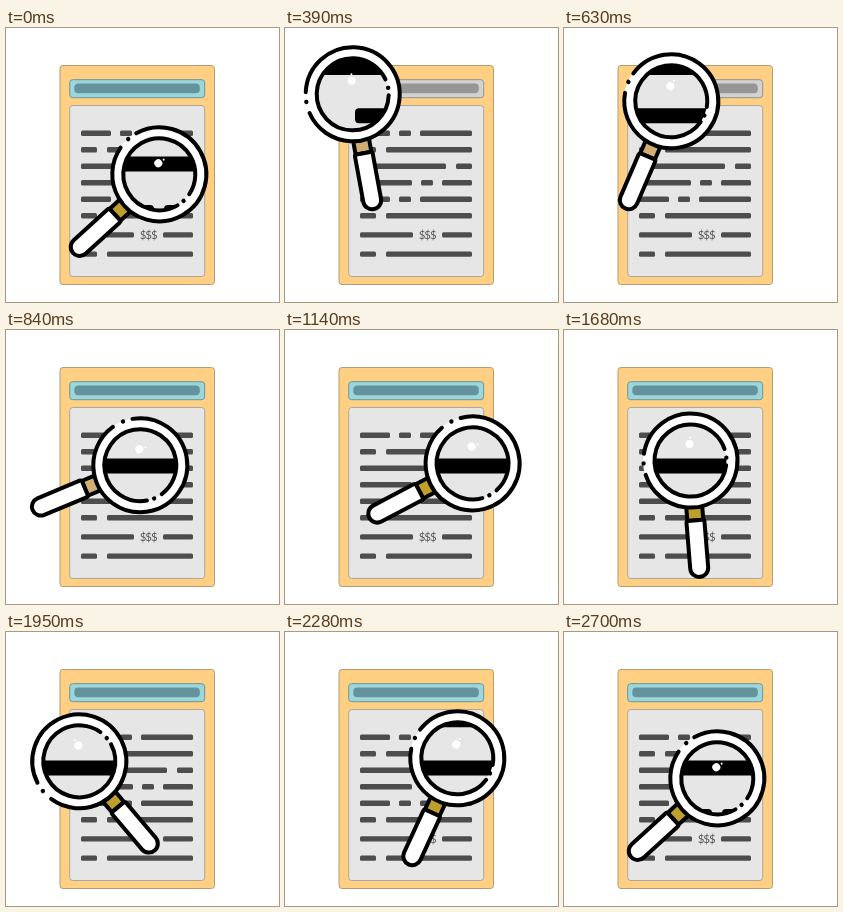
These frames come from a looping animation (273 by 274 pixels, 3630 ms). An HTML page with a canvas:

```html
<!DOCTYPE html>
<html lang="en">
<head>
<meta charset="utf-8">
<title>Document search</title>
<style>
html, body { margin: 0; width: 100%; height: 100%; overflow: hidden; background: #fff; }
canvas { display: block; }
</style>
</head>
<body>
<canvas id="stage"></canvas>
<script>
const W = 273, H = 274, LOOP = 3630, STEP = 30, TRAVEL = 2700;
const RAD = Math.PI / 180;
const canvas = document.getElementById('stage');
const ctx = canvas.getContext('2d');
const ratio = window.devicePixelRatio || 1;
canvas.width = W * ratio;
canvas.height = H * ratio;
canvas.style.width = W + 'px';
canvas.style.height = H + 'px';

// Key points of the search path: the glass returns to rest where it began.
const rest = { x: 153.3, y: 146.3, angle: 137.6 };
const path = [
  { t: 0, ...rest },
  { t: 300, x: 55.5, y: 82, angle: 88 },
  { t: 390, x: 67.7, y: 66.3, angle: 79.6 },
  { t: 550, x: 96, y: 59, angle: 96 },
  { t: 840, x: 134.3, y: 135.2, angle: 157.4 },
  { t: 1330, x: 205, y: 132, angle: 145 },
  { t: 1950, x: 73.3, y: 129.3, angle: 49.8 },
  { t: 2280, x: 172.3, y: 126.3, angle: 114.7 },
  { t: TRAVEL, ...rest }
];

function secant(i, key) {
  const a = path[i], b = path[i + 1];
  return (b[key] - a[key]) / (b.t - a.t);
}

// Monotone slopes: flat at every turning point, so nothing overshoots.
function slope(i, key) {
  if (i === 0 || i === path.length - 1) return 0;
  const a = secant(i - 1, key), b = secant(i, key);
  return a * b <= 0 ? 0 : 2 * a * b / (a + b);
}

function glassAt(t) {
  if (t >= TRAVEL) return rest;
  let i = 0;
  while (path[i + 1].t <= t) i++;
  const a = path[i], b = path[i + 1], span = b.t - a.t;
  const u = (t - a.t) / span, v = 1 - u;
  const blend = key =>
    v * v * (1 + 2 * u) * a[key] + u * u * (3 - 2 * u) * b[key] +
    span * u * v * (v * slope(i, key) - u * slope(i + 1, key));
  return { x: blend('x'), y: blend('y'), angle: blend('angle') };
}

function box(x, y, w, h, r, fill, stroke, lineWidth = 1) {
  ctx.beginPath();
  ctx.roundRect(x, y, w, h, r);
  ctx.fillStyle = fill;
  ctx.fill();
  if (stroke) {
    ctx.strokeStyle = stroke;
    ctx.lineWidth = lineWidth;
    ctx.stroke();
  }
}

function disc(x, y, r, fill) {
  ctx.beginPath();
  ctx.arc(x, y, r, 0, Math.PI * 2);
  ctx.fillStyle = fill;
  ctx.fill();
}

// Text bars are word lengths justified to one column width.
function drawText() {
  const left = 75, column = 112;
  const three = [30, 12, 52], two = [16, 86], price = [53, 30];
  const rows = [three, two, two.toReversed(), three.toReversed(), three, two, price, two];
  rows.forEach((words, i) => {
    const y = 105.2 + 16.5 * i + 2.7 * Math.max(0, i - 5);
    const gap = (column - words.reduce((a, b) => a + b)) / (words.length - 1);
    let x = left;
    for (const word of words) {
      box(x, y - 2.7, word, 5.4, 1.5, '#4d4d4d');
      x += word + gap;
    }
  });
  ctx.fillStyle = '#555';
  ctx.font = '11.5px Lato, sans-serif';
  ctx.letterSpacing = '-1px';
  ctx.textAlign = 'center';
  ctx.fillText('$$$', 142.2, 211.3);
}

function drawDocument(headerCovered) {
  const [field, bar, edge] = headerCovered
    ? ['#d2d2d2', '#969696', '#929292']
    : ['#9bd7da', '#64939e', '#6d9598'];
  box(54, 37.5, 154.5, 219, 3, '#ffd083', '#b49b76');
  box(63.7, 51.7, 135, 18, 3, field, edge);
  box(68.3, 55.5, 125.5, 9.7, 4, bar);
  box(63.7, 77.5, 135, 171, 3, '#e6e6e6', '#aaa79f');
  drawText();
}

// The enlarged page stays still; the lens only uncovers it.
function drawEnlargedText() {
  const thick = 15;
  const line = (row, from, to) =>
    box(from, 39.5 + 48.3 * row - thick / 2, to - from, thick, 4, '#000');
  line(0, -9, W + 9);
  line(1, 70, W + 9);
  line(2, -9, W + 9);
  line(3, -9, 148);
  line(3, 158, W + 9);
}

// Ring outline with a dot set in its opening.
function brokenRing(radius, angle) {
  ctx.beginPath();
  ctx.arc(0, 0, radius, (angle + 12) * RAD, (angle + 346) * RAD);
  ctx.lineWidth = 4;
  ctx.lineCap = 'round';
  ctx.strokeStyle = '#000';
  ctx.stroke();
  disc(radius * Math.cos(angle * RAD), radius * Math.sin(angle * RAD), 2.2, '#000');
}

function turned(x, y, angle, draw) {
  ctx.save();
  ctx.translate(x, y);
  ctx.rotate(angle * RAD);
  draw();
  ctx.restore();
}

function drawGlass({ x, y, angle }, t) {
  const collar = t >= 210 && t < 1110 ? '#d3ae73' : '#bd9f2b';
  turned(x, y, angle, () => {
    box(46, -8, 14, 16, 1, collar, '#000', 4);
    box(60, -9, 56.7, 18, [2, 9, 9, 2], '#fff', '#000', 4);
    disc(0, 0, 47.5, '#fff');
  });

  ctx.save();
  ctx.beginPath();
  ctx.arc(x, y, 36, 0, Math.PI * 2);
  ctx.clip();
  ctx.fillStyle = '#e6e6e6';
  ctx.fillRect(0, 0, W, H);
  drawEnlargedText();
  ctx.restore();

  const lift = 11 + 6 * Math.sin(Math.PI * Math.min(t / TRAVEL, 1));
  turned(x - 1, y - lift, angle + 188, () => {
    disc(0, 0, 4, '#fff');
    disc(6.5, 0, 1, '#fff');
  });
  turned(x, y, angle, () => {
    brokenRing(47, 91);
    brokenRing(36, -90);
  });
}

function frame(now) {
  const t = Math.floor((now % LOOP) / STEP) * STEP;
  const glass = glassAt(t);
  ctx.setTransform(ratio, 0, 0, ratio, 0, 0);
  ctx.fillStyle = '#fff';
  ctx.fillRect(0, 0, W, H);
  drawDocument(glass.y < 85);
  drawGlass(glass, t);
}

let start;
function tick(now) {
  start ??= now;
  frame(now - start);
  requestAnimationFrame(tick);
}
frame(0);
requestAnimationFrame(tick);
</script>
</body>
</html>
```
